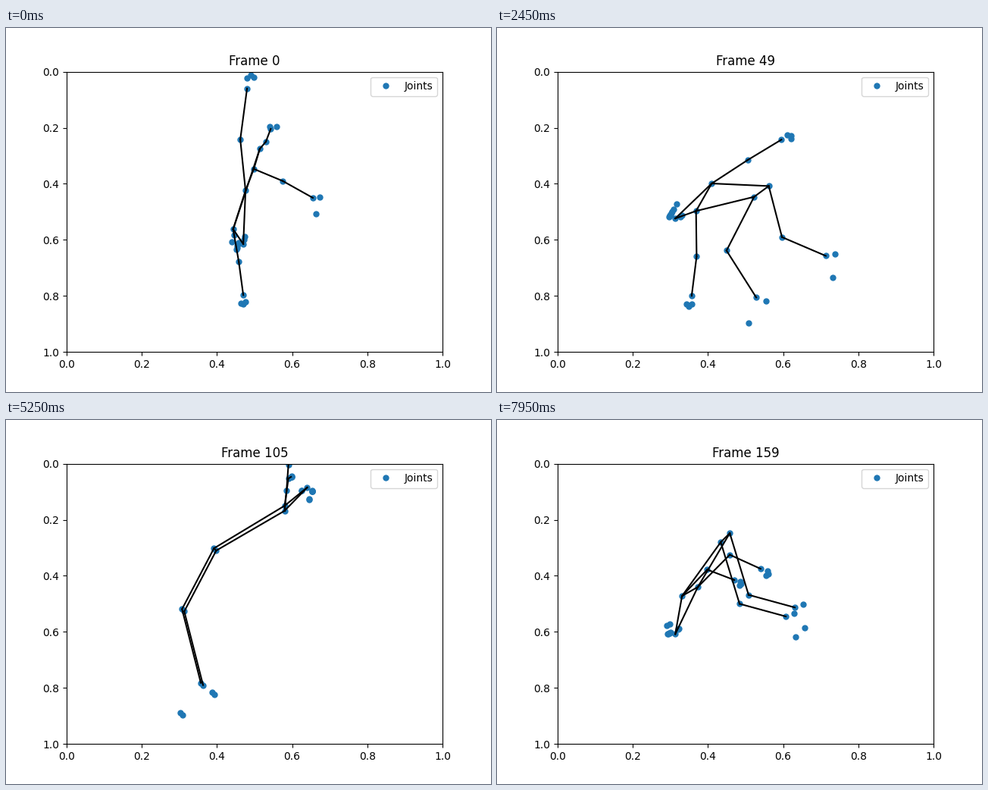
Write a matplotlib script that moves like this. It is 640 px wide and 480 px high and loops after 8 s.

```python
import numpy as np
import matplotlib.pyplot as plt
from matplotlib.animation import FuncAnimation

FRAMES = 160
INTERVAL = 50
ASPECT = 369.6 / 496  # axes height over width

# Offsets as multiples of a bone: real along it, imaginary across it.
HAND = (.2 - .03j, .27 + .04j, .23 + .1j)
FOOT = (.155 - .115j, .31 + .36j)
# Face rows in axes widths (offset from the nose) with their sideways spread.
FACE = ((-.018 + .026j, (-.18, .18)),             # ears
        (.003 + .016j, (-.18, -.1, 0, .1, .18)),  # eyes
        (-.016 - .004j, (-.07, .07)))             # mouth

times, poses = [], []


def to_complex(coords):
    x, y = np.reshape(coords, (-1, 2)).T
    return x + 1j * ASPECT * y


def pose(frame, nose, *limbs):
    """Limbs: arm, arm, leg, leg. One given only by its root copies its partner."""
    nose, *limbs = [to_complex(part) for part in (nose, *limbs)]
    for i in (1, 3):
        if len(limbs[i]) == 1:
            limbs[i] = limbs[i - 1] - limbs[i - 1][0] + limbs[i][0]
    times.append(frame)
    poses.append(np.concatenate([nose, *limbs]))


# handstand on one arm
pose(0, (.47, .615),
     (.443, .562, .458, .678, .47, .797), (.476, .424, .462, .242, .48, .06),
     (.514, .275, .53, .25, .543, .204), (.498, .347, .575, .39, .655, .45))
# legs swing over
pose(32, (.42, .605),
     (.423, .537, .43, .69, .427, .83), (.448, .43, .478, .283, .495, .167),
     (.522, .38, .508, .597, .585, .762), (.553, .318, .653, .35, .746, .302))
# crouch
pose(65, (.32, .32),
     (.383, .412, .375, .578, .345, .715), (.44, .325, .532, .415, .595, .558),
     (.523, .537, .422, .702, .504, .87), (.565, .52, .432, .67, .5, .853))
# arms thrown up
pose(81, (.434, .167),
     (.484, .296, .388, .296, .307, .183), (.453, .29),
     (.5, .633, .38, .788, .486, .952), (.464, .602, .347, .697, .417, .835))
# jump backwards
pose(105, (.64, .085),
     (.58, .168, .585, .097, .59, .005), (.58, .15, .59, .053, .597, .047),
     (.398, .31, .313, .527, .363, .79), (.392, .302))
# lying in the air
pose(124, (.636, .2),
     (.558, .27, .468, .183, .452, .048), (.573, .228),
     (.39, .278, .323, .072, .21, .135), (.398, .25))
# tucked, head down
pose(159, (.313, .608),
     (.331, .472, .398, .378, .47, .415), (.373, .44, .458, .325, .54, .375),
     (.434, .28, .484, .5, .607, .545), (.458, .248))


def tween(vals):
    """Monotone cubic through the key poses, sampled at every frame."""
    if np.iscomplexobj(vals):
        return tween(vals.real) + 1j * tween(vals.imag)
    knots = np.array(times)
    h = np.diff(knots)
    d = np.diff(vals) / h
    same = d[:-1] * d[1:] > 0
    total = np.where(same, d[:-1] + d[1:], 1)
    inner = np.where(same, 2 * d[:-1] * d[1:] / total, 0)
    m = np.concatenate([d[:1], inner, d[-1:]])
    t = np.arange(FRAMES)
    k = np.clip(np.searchsorted(knots, t, side="right") - 1, 0, len(h) - 1)
    s = (t - knots[k]) / h[k]
    return ((1 + 2 * s) * (1 - s) ** 2 * vals[k] + s * (1 - s) ** 2 * h[k] * m[k]
            + s * s * (3 - 2 * s) * vals[k + 1] - s * s * (1 - s) * h[k] * m[k + 1])


def swing(bone):
    """Turn and stretch a bone, clockwise unless the way back is much shorter."""
    angle = np.angle(bone)
    back = np.radians(130)
    steps = (np.diff(angle) + back) % (2 * np.pi) - back
    angle = angle[0] + np.concatenate([[0], np.cumsum(steps)])
    return np.exp(tween(np.log(np.abs(bone)) + 1j * angle))


# nose 0, arms 1-3 and 4-6, legs 7-9 and 10-12
key = np.array(poses).T
key_pelvis, key_chest = (key[7] + key[10]) / 2, (key[1] + key[4]) / 2
pelvis = tween(key_pelvis)
chest = pelvis + swing(key_chest - key_pelvis)
shoulder = tween((key[1] - key[4]) / 2)
hip = tween((key[7] - key[10]) / 2)
neck = swing(key[0] - key_chest)
nose = chest + neck

joints = [nose]
extras = [nose + offset * neck / np.abs(neck) + side * shoulder
          for offset, spread in FACE for side in spread]
for first, root, tips in ((1, chest + shoulder, HAND), (4, chest - shoulder, HAND),
                          (7, pelvis + hip, FOOT), (10, pelvis - hip, FOOT)):
    middle = root + swing(key[first + 1] - key[first])
    lower = swing(key[first + 2] - key[first + 1])
    joints += [root, middle, middle + lower]
    extras += [middle + lower * (1 + tip) for tip in tips]

points = np.array(joints + extras)
px, py = points.real, points.imag / ASPECT

EDGES = [(0, 1), (0, 4), (1, 4), (1, 7), (4, 10), (7, 10)]
EDGES += [(i + j, i + j + 1) for i in (1, 4, 7, 10) for j in (0, 1)]

fig, ax = plt.subplots(figsize=(6.4, 4.8), dpi=100)
ax.set_xlim(0, 1)
ax.set_ylim(1, 0)
dots, = ax.plot([], [], "o", color="tab:blue", markersize=5, label="Joints")
lines = [ax.plot([], [], "k-")[0] for _ in EDGES]
ax.legend(loc="upper right")
title = ax.set_title("Frame 0")


def update(n):
    dots.set_data(px[:, n], py[:, n])
    for line, edge in zip(lines, EDGES):
        line.set_data(px[list(edge), n], py[list(edge), n])
    title.set_text(f"Frame {n}")
    return [dots, title, *lines]


anim = FuncAnimation(fig, update, frames=FRAMES, interval=INTERVAL,
                     repeat=True, repeat_delay=0, blit=False)
plt.show()
```
